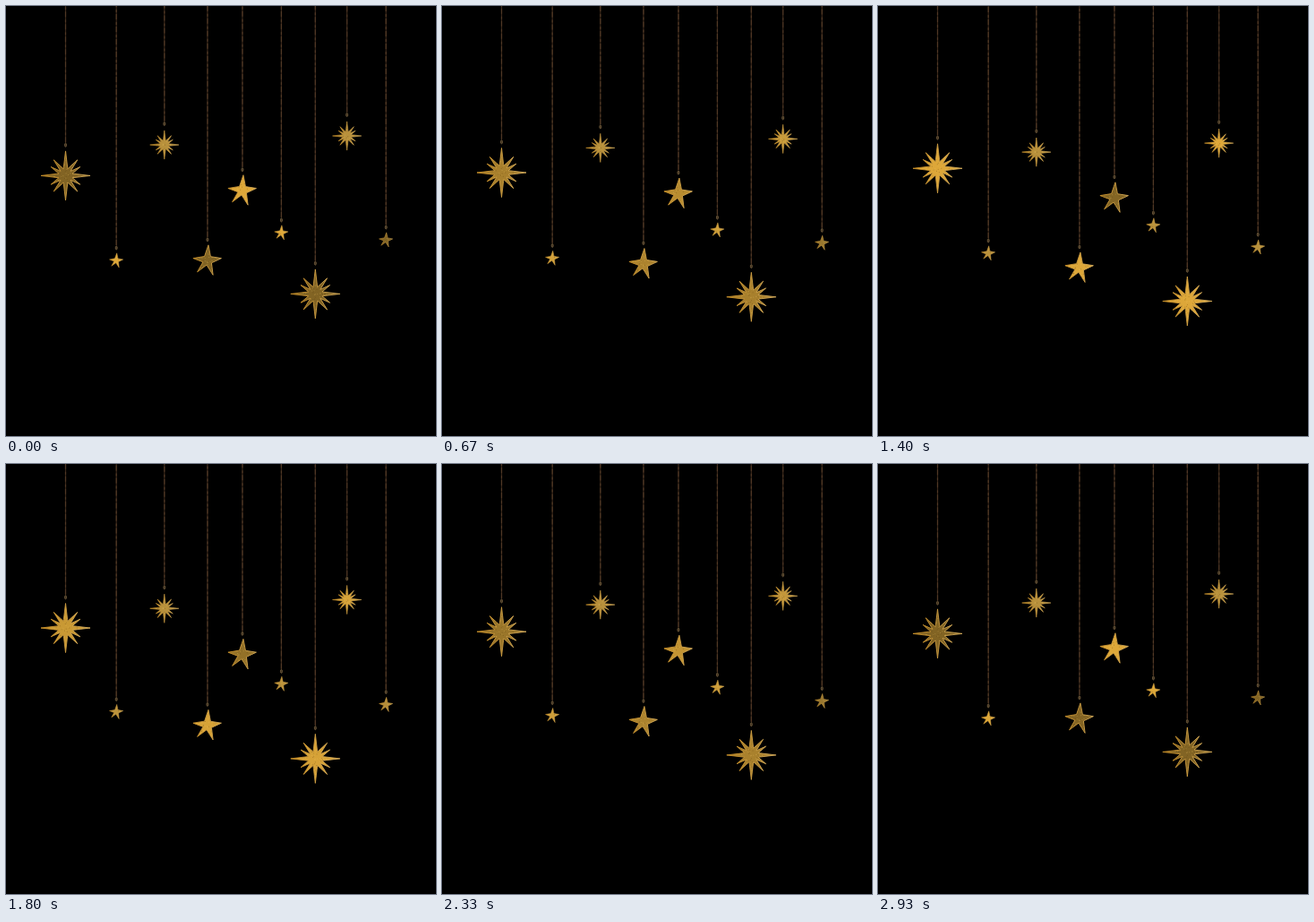
Write an HTML page with a canvas that moves like this. It is 480 px wide and 480 px high and loops after 2.99 s.

```html
<!DOCTYPE html>
<html lang="en">
<head>
<meta charset="utf-8">
<title>Hanging stars</title>
<style>
html, body { margin: 0; width: 100%; height: 100%; overflow: hidden; background: #000; }
canvas { display: block; width: 480px; height: 480px; }
</style>
</head>
<body>
<canvas id="stage" width="480" height="480"></canvas>
<script>
const ctx = document.getElementById('stage').getContext('2d');
const LOOP = 2990, STEPS = 45, TRAVEL = 8.2;
const DIM = [130, 100, 36], MID = [184, 145, 60], BRIGHT = [222, 168, 57];

// dir: vertical travel, rise and fall: easing exponents of the two halves
const stars = [
  { x: 66.5, y: 189.4, kind: 'big', dir: -1, rise: 1, fall: 0.72, from: DIM, to: BRIGHT },
  { x: 123.2, y: 284, kind: 'tiny', dir: -1, rise: 1.2, fall: 1, from: BRIGHT, to: MID },
  { x: 176.8, y: 155, kind: 'burst', dir: 1, rise: 1, fall: 0.7, from: MID, to: MID },
  { x: 224.9, y: 283.8, kind: 'five', dir: 1, rise: 0.92, fall: 1.08, from: DIM, to: BRIGHT },
  { x: 263.9, y: 205.7, kind: 'five', dir: 1, rise: 1, fall: 0.78, from: BRIGHT, to: DIM },
  { x: 307.4, y: 253, kind: 'tiny', dir: -1, rise: 1.1, fall: 1.08, from: BRIGHT, to: MID },
  { x: 345.3, y: 321.4, kind: 'big', dir: 1, rise: 1, fall: 1.03, from: DIM, to: BRIGHT },
  { x: 380.6, y: 145, kind: 'burst', dir: 1, rise: 1, fall: 0.75, from: MID, to: BRIGHT },
  { x: 424.2, y: 261, kind: 'tiny', dir: 1, rise: 1, fall: 1.05, from: DIM, to: MID }
];

// One long ray and two shorter ones in each quarter, with notches between
function twelvePoint(scale) {
  const quarter = [[0, 27.5], [17, 8], [37, 22], [48, 7.5], [59, 19], [73, 8]];
  const points = [];
  for (let q = 0; q < 4; q++) {
    // every other quarter is mirrored so that the star is symmetric
    const part = q % 2 ? [[0, 27.5], ...quarter.slice(1).reverse().map(([a, r]) => [90 - a, r])] : quarter;
    for (const [deg, r] of part) {
      const a = (q * 90 + deg) * Math.PI / 180;
      points.push([Math.sin(a) * r * scale, -Math.cos(a) * r * scale]);
    }
  }
  return points;
}

function fivePoint(scale, notch) {
  const tips = [[1, -17], [15.5, -2.2], [6.2, 16.5], [-11.3, 13], [-16, -2.2]];
  const points = [];
  tips.forEach(([x, y], i) => {
    const [nx, ny] = tips[(i + 1) % 5];
    const mx = x + nx, my = y + ny, k = notch / Math.hypot(mx, my);
    points.push([x * scale, y * scale], [mx * k, my * k]);
  });
  return points;
}

function toPath(points) {
  const path = new Path2D();
  points.forEach(([x, y]) => path.lineTo(x, y));
  path.closePath();
  return path;
}

const kinds = {
  big: { path: toPath(twelvePoint(1)), hang: 34.2, size: 18, grains: 110, line: 0.9 },
  burst: { path: toPath(twelvePoint(0.585)), hang: 23.5, size: 10, grains: 35, line: 0.6 },
  five: { path: toPath(fivePoint(1, 5.4)), hang: 23, size: 14, grains: 80, line: 0.9 },
  tiny: { path: toPath(fivePoint(0.48, 2.8)), hang: 14, size: 7, grains: 14, line: 0.5 }
};

function random(seed) {
  return () => (seed = (seed * 16807) % 2147483647) / 2147483647;
}

function mix(a, b, u) {
  return 'rgb(' + a.map((v, i) => Math.round(v + (b[i] - v) * u)) + ')';
}

function swing(star, p) {
  const r = p < 0.5 ? (p * 2) ** star.rise : 1 - (p * 2 - 1) ** star.fall;
  return (1 - Math.cos(Math.PI * r)) / 2;
}

function drawString(x, end) {
  ctx.lineWidth = 1.2;
  ctx.strokeStyle = '#3a281b';
  ctx.beginPath();
  ctx.moveTo(x, 0);
  ctx.lineTo(x, end - 2.5);
  ctx.stroke();
  ctx.strokeStyle = '#4f3725';
  ctx.setLineDash([3, 2, 6, 3]);
  ctx.lineDashOffset = -end;
  ctx.stroke();
  ctx.setLineDash([]);
  ctx.lineWidth = 0.9;
  ctx.fillStyle = '#3c2f20';
  ctx.strokeStyle = '#715c3c';
  ctx.beginPath();
  ctx.ellipse(x, end, 1, 2, 0, 0, 2 * Math.PI);
  ctx.fill();
  ctx.stroke();
}

function drawStar(star, seed, u) {
  const { path, hang, size, grains, line } = kinds[star.kind];
  const y = star.y + star.dir * TRAVEL * u;
  drawString(star.x, y - hang);
  ctx.save();
  ctx.translate(star.x, y);
  ctx.fillStyle = mix(star.from, star.to, u);
  ctx.fill(path);
  const rim = ctx.createLinearGradient(-size, 0, size, 0);
  rim.addColorStop(0, '#c8902a');
  rim.addColorStop(1, '#d4ab5a');
  ctx.lineWidth = line;
  ctx.lineJoin = 'bevel';
  ctx.strokeStyle = rim;
  ctx.stroke(path);
  ctx.clip(path);
  const rnd = random(seed);
  for (let i = 0; i < grains; i++) {
    ctx.fillStyle = rnd() < 0.5 ? 'rgba(90,62,14,.3)' : 'rgba(244,202,104,.3)';
    ctx.fillRect((rnd() * 2 - 1) * size, (rnd() * 2 - 1) * size, 1, 1);
  }
  ctx.restore();
}

function draw(now) {
  const t = Math.floor((now % LOOP) / 10) * 10;
  const step = Math.min(STEPS - 1, Math.floor((t + 3.4) * 15 / 1000));
  ctx.fillStyle = '#000';
  ctx.fillRect(0, 0, 480, 480);
  stars.forEach((star, i) => drawStar(star, 1000 + i * 773, swing(star, step / STEPS)));
}

let start;
function tick(now) {
  if (start === undefined) start = now;
  draw(Math.max(0, now - start));
  requestAnimationFrame(tick);
}
draw(0);
requestAnimationFrame(tick);
</script>
</body>
</html>
```
